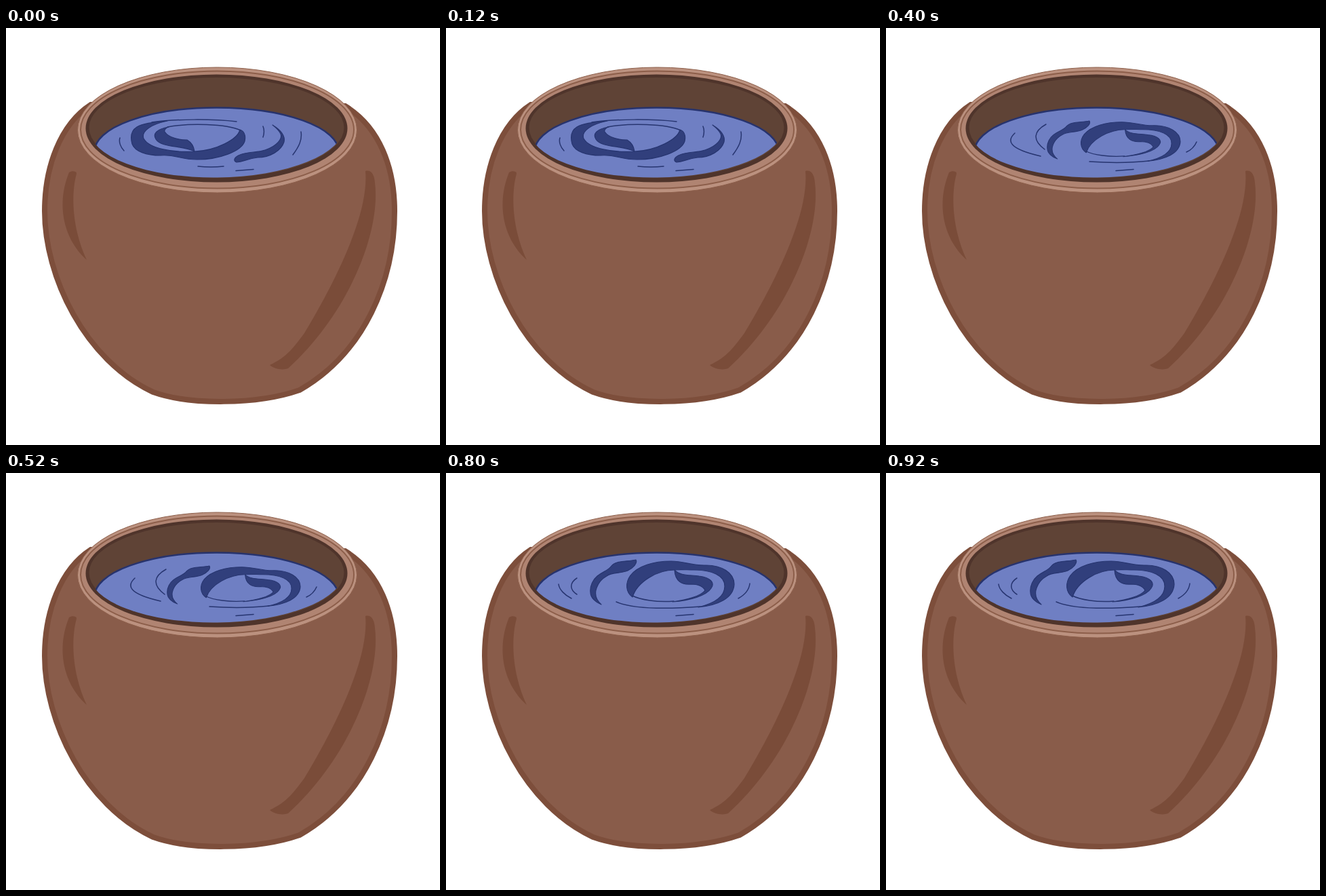
Write an HTML page that moves like this. It is 640 px wide and 615 px high and loops after 1 s.

```html
<!DOCTYPE html>
<html lang="en">
<head>
<meta charset="utf-8">
<title>Swirling water in a clay pot</title>
<style>
  html, body { margin: 0; height: 100%; overflow: hidden; background: #fff; }
  svg { display: block; width: 100%; height: 100%; }
  .line { fill: none; stroke: #273570; stroke-width: 1.5; stroke-linecap: round; }
  .deep { fill: #313f7c; stroke: #273570; stroke-width: 1.2; stroke-linejoin: round; }
  .shade { fill: #7a4c39; }
</style>
</head>
<body>
<svg viewBox="0 0 640 615">
  <defs>
    <clipPath id="inside"><ellipse cx="310.5" cy="147" rx="188" ry="73.5" transform="rotate(-.6 310.5 147)"/></clipPath>
    <g id="left">
      <path class="deep" d="M238 137C215 139 201 141 193 146C185 151 183 160 186 171C190 182 207 188 228 188C250 186 256 194 282 194C314 194 347 182 352 167C354 158 351 152 345 150C342 164 310 181 278 182C247 184 211 178 203 163C199 152 214 142 238 137Z"/>
      <path class="deep" d="M240 146C222 149 216 156 221 164C229 177 261 173 278 182C277 175 274 169 267 165C255 165 240 162 234 153C233 150 236 147 240 146Z"/>
      <path class="deep" d="M393 143C406 151 412 159 410 168C406 181 389 191 371 191C355 193 351 197 340 198C334 196 337 190 345 187C357 182 370 184 382 180C400 174 408 163 405 156C402 150 397 146 393 143Z"/>
      <path class="line" d="M238 146C270 140 325 141 346 151M215 139C250 134 305 134 340 138"/>
    </g>
    <g id="right">
      <path class="deep" d="M229 194C221 191 213 184 213 176C212 166 217 157 223 152C232 145 239 144 244 137C250 129 266 131 280 128C283 133 276 140 268 144C255 149 245 146 237 152C226 158 211 178 229 194Z"/>
      <path class="deep" d="M275 183C265 176 264 162 272 151C283 137 306 130 332 130C352 130 363 137 384 136C406 136 425 147 425 164C424 185 401 195 372 198C397 192 411 182 411 167C411 151 392 143 365 143C355 143 346 142 337 143C312 143 282 160 275 183Z"/>
      <path class="deep" d="M337 143C345 152 360 150 373 152C390 154 397 162 391 170C384 181 360 188 334 190C356 187 377 181 382 173C379 167 371 164 361 164C348 165 338 160 337 143Z"/>
      <path class="line" d="M275 181C286 187 312 191 336 189"/>
    </g>
  </defs>

  <path d="M125 113C80 142 57 205 57 270C57 366 116 490 217 537C270 556 370 556 433 534C529 479 573 372 573 270C573 206 551 146 500 115Z"
        fill="#895c4a" stroke="#7d4e3b" stroke-width="8"/>
  <path class="shade" d="M93 213C97 210 105 211 104 215C97 240 95 290 119 342C88 315 72 265 93 213Z"/>
  <path class="shade" d="M530 211C538 209 543 215 544 228C553 300 506 420 416 502C408 505 395 503 389 497C415 485 425 470 440 450C482 380 536 276 530 211Z"/>

  <ellipse cx="311.5" cy="150.5" rx="206" ry="92.5" fill="#bb917f" stroke="#8c5e4a"/>
  <ellipse cx="311.5" cy="150" rx="201.5" ry="86.5" fill="#b08472" stroke="#8c5e4a" stroke-width="2"/>
  <ellipse cx="310.5" cy="148" rx="193" ry="79.5" fill="#4f342b"/>
  <ellipse cx="310.5" cy="147" rx="188" ry="74" fill="#5f4336"/>
  <g clip-path="url(#inside)">
    <ellipse cx="310.5" cy="182" rx="180" ry="64.5" fill="#6f7fc3" stroke="#27336d" stroke-width="2.5"/>
  </g>
  <path class="line" d="M339 210.5L365 208.5"/>
  <use id="swirl"/>
  <path id="ripples" class="line"/>
</svg>
<script>
  const squeeze = "matrix(.925 0 0 .85 40.9 28.2)";
  const spin = {
    swirl: "#right",
    ripples: "M251 190C270 198 310 202 375 197M166 164C167 172 175 180 185 185M193 155C182 162 182 172 193 179M448 163C447 172 440 180 431 185"
  };
  const poses = [
    { swirl: "#left",
      ripples: "M168 162C166 168 169 176 174 181M379 145C381 150 381 155 379 161M435 153C437 165 432 175 423 187M283 204Q302 206 321 204" },
    spin,
    { swirl: "#right", transform: squeeze,
      ripples: "M300 197C330 199 360 199 388 196M190 155C178 166 180 178 228 189M236 142C218 152 215 165 234 179M458 168C455 175 450 180 443 183" },
    { swirl: "#left",
      ripples: "M362 149C374 153 376 162 372 171M425 151C445 160 442 178 401 193M255 204C270 206 290 204 311 202" },
    spin
  ];
  const swirl = document.getElementById("swirl");
  const ripples = document.getElementById("ripples");

  function draw() {
    const pose = poses[Math.floor(performance.now() % 1000 / 200)];
    swirl.setAttribute("href", pose.swirl);
    swirl.setAttribute("transform", pose.transform || "translate(0)");
    ripples.setAttribute("d", pose.ripples);
    requestAnimationFrame(draw);
  }
  draw();
</script>
</body>
</html>
```
